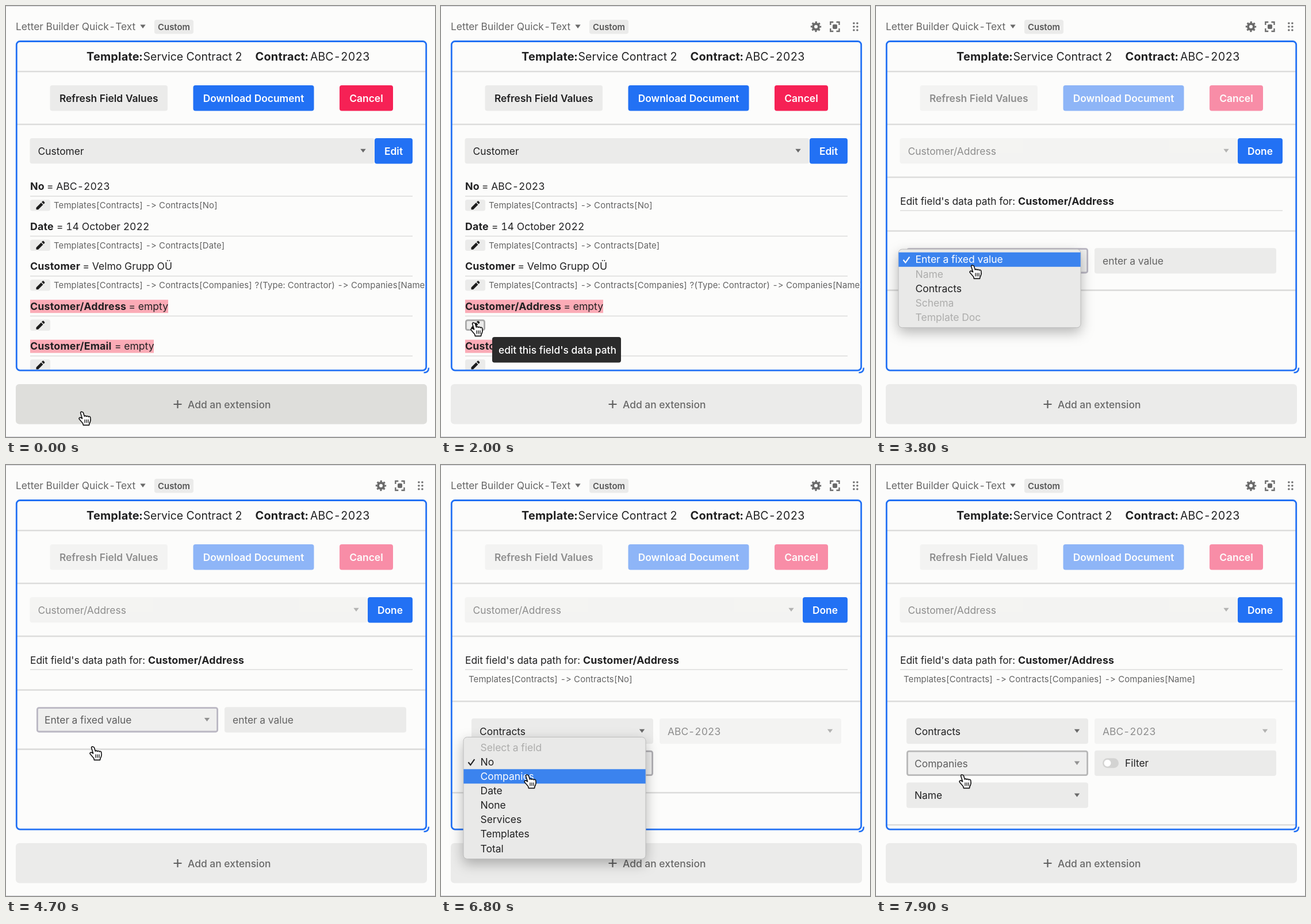
An HTML page for the animation above (8000 ms loop, 746x750 px).

```html
<!DOCTYPE html>
<html lang="en">
<head>
<meta charset="utf-8">
<title>Field data path editor</title>
<style>
  html, body { margin: 0; width: 100%; height: 100%; overflow: hidden; background: #fcfcfb; }
  svg { display: block; width: 746px; height: 750px; }
  text {
    font-family: Inter, "Open Sans", sans-serif;
    font-size: 17.4px;
    font-feature-settings: "calt" 0, "tnum" 1;
    fill: #212122;
    white-space: pre;
  }
  .bold { font-size: 17.8px; font-weight: 700; letter-spacing: .2px; }
  .mid { font-weight: 500; }
  .semi { font-weight: 600; }
  .value { font-size: 17.6px; }
  .head { font-size: 19.5px; }
  .head.bold { font-size: 19.9px; }
  .path { font-size: 14.9px; letter-spacing: .13px; fill: #636363; }
  .menu { font-size: 17.5px; }
  .shadow { filter: drop-shadow(0 8px 11px rgba(0, 0, 0, .28)); }
</style>
</head>
<body>
<svg id="stage" viewBox="0 0 746 750"></svg>
<script>
const LOOP = 8000, STEP = 100;
const BLUE = '#2271f4', RED = '#f62155', GREY = '#ebebea', RULE = '#dcdcdb', ICON = '#6a6a6a';
const ROW_H = 25.1, MENU_PAD = 5.5;

// Moments at which the interface switches state.
const T = {
  enter: 600, leaveAdd: 500, tip: 1600, press: 1900, edit: 2400,
  hover: 2900, open1: 3300, close1: 4600, contracts: 5000,
  hoverNo: 5300, open2: 5800, close2: 7100, companies: 7500
};

// Pointer hot spot: time, x, y.
const track = [
  [0, 133, 706], [200, 133, 706], [1300, 58, 551], [2400, 58, 551],
  [3100, 169, 450], [3800, 169, 451], [4300, 152, 490], [4900, 152, 490],
  [5400, 158, 517], [6200, 158, 517], [6700, 151, 539], [LOOP, 151, 539]
];

const rect = (x, y, w, h, r, fill, extra = '') =>
  `<rect x="${x}" y="${y}" width="${w}" height="${h}" rx="${r}" fill="${fill}" ${extra}/>`;
const text = (x, y, s, cls = '', extra = '') =>
  `<text x="${x}" y="${y}" class="${cls}" ${extra}>${s}</text>`;
const path = (d, stroke, width, extra = '') =>
  `<path d="${d}" fill="none" stroke="${stroke}" stroke-width="${width}" ${extra}/>`;
const during = (from, to, s) => `<g data-from="${from}" data-to="${to}">${s}</g>`;
const faded = (s, o = .5) => `<g opacity="${o}">${s}</g>`;
const divider = y => path(`M19 ${y}H730`, RULE, 2.6);
const rule = y => path(`M42 ${y}H707`, RULE, 1.4);
const arrow = (x, y) => `<path d="M${x - 4.7} ${y - 3.2}h9.4l-4.7 6.3z" fill="${ICON}"/>`;
const ring = (x, y, w, h, color = '#b0afb4') =>
  rect(x + 1.4, y + 1.4, w - 2.8, h - 2.8, 3, 'none', `stroke="${color}" stroke-width="2.8"`);

const button = (x, w, y, label, fill, color) =>
  rect(x, y, w, 44.5, 4, fill) +
  text(x + w / 2, y + 29, label, 'semi', `text-anchor="middle" style="fill:${color}"`);

const select = (x, y, w, label) =>
  rect(x, y, w, 44.2, 4, GREY) + text(x + 14, y + 28.8, label) + arrow(x + w - 19.5, y + 22);

const toolbar = () =>
  button(76.5, 204.5, 138, 'Refresh Field Values', GREY, '#212122') +
  button(325.5, 210, 138, 'Download Document', BLUE, '#fff') +
  button(580, 93, 138, 'Cancel', RED, '#fff');

const pencil = y =>
  rect(42, y, 35, 19.5, 3.5, GREY) +
  `<path transform="translate(52.5 ${y + 2.2})" fill="#1c1c1c"
    d="M0 11.5V15h3.5L12 6.5 8.5 3zM9.5 2 11.2.4q.8-.7 1.6 0l1.8 1.8q.7.8 0 1.6L13 5.5z"/>`;

function field(i, name, eqX, value, source, markW) {
  const y = 320 + i * 69.5;
  return (markW ? rect(42, y - 17.3, markW, 23, 0, '#fbabb6') : '') +
    text(42, y, name, 'bold') + text(eqX, y, '= ' + value, 'value') +
    rule(y + 11) + pencil(y + 17) + text(83, y + 32.3, source, 'path');
}

function menu(top, items, checked) {
  const center = i => top + MENU_PAD + (i + .5) * ROW_H;
  const rows = items.map((s, i) => {
    const off = s[0] === '~';
    return text(68.5, center(i) + 6.2, off ? s.slice(1) : s, 'menu',
      `data-row="${i}" ${off ? 'data-off style="fill:#adadac"' : ''}`);
  }).join('');
  const c = center(checked);
  return `<g class="menu-box" data-top="${top}">` +
    rect(39, top, 317, items.length * ROW_H + 2 * MENU_PAD, 6.5, '#e9e9e8',
      'class="shadow" stroke="#bcbcbc" stroke-width="1"') +
    rect(39.3, 0, 316.4, ROW_H, 0, '#3b83ee', 'class="mark"') + rows +
    path(`M47.5 ${c + .5}l3.8 4.8 7-10`, '#212122', 2.1, `class="tick" data-row="${checked}"`) + '</g>';
}

const contracts = 'Templates[Contracts] -> Contracts';

const chrome =
  path('M0 .5H746M0 749.5H746', '#d5d5da', 1) +
  text(17, 42.3, 'Letter Builder Quick-Text', '', 'style="fill:#666"') + arrow(238, 35.8) +
  rect(258, 24, 68, 24.5, 4, GREY) +
  text(292, 41.8, 'Custom', 'semi', 'text-anchor="middle" style="font-size:14.9px;fill:#555"') +
  during(T.enter, LOOP,
    `<g fill="none" stroke="${ICON}">
      <circle cx="652" cy="36" r="5" stroke-width="4"/>
      <circle cx="652" cy="36" r="7.8" stroke-width="2.8" stroke-dasharray="3.1 3.026" stroke-dashoffset="1.55"/>
      <path d="M677.3 33v-5h5M687.5 28h5v5M692.5 39v5h-5M682.3 44h-5v-5" stroke-width="2.3"/>
    </g>` + rect(681, 32, 8, 8, 2, ICON) +
    [0, 1, 2, 3, 4, 5].map(i =>
      rect(716.3 + i % 2 * 6, 28.4 + (i >> 1) * 6, 3.2, 3.2, 1, ICON)).join(''));

const addButton =
  rect(17, 658, 715, 69.5, 6, GREY) +
  during(0, T.leaveAdd, rect(17, 658, 715, 69.5, 6, '#dededb')) +
  path('M291.5 693h14M298.5 686v14', '#606060', 2.2) +
  text(316, 699.6, 'Add an extension', 'mid', 'style="fill:#686868"');

const listView =
  toolbar() + select(41.5, 230, 599, 'Customer') +
  button(641, 66, 230, 'Edit', BLUE, '#fff') +
  field(0, 'No', 71, 'ABC-2023', contracts + '[No]') +
  field(1, 'Date', 88, '14 October 2022', contracts + '[Date]') +
  field(2, 'Customer', 133.5, 'Velmo Grupp OÜ',
    contracts + '[Companies] ?(Type: Contractor) -> Companies[Name]') +
  field(3, 'Customer/Address', 213.5, 'empty', '', 240) +
  field(4, 'Customer/Email', 189, 'empty', '', 215) +
  during(T.press, T.edit, ring(42, 545.5, 35, 19.5, '#a8a8a8')) +
  during(T.tip, T.edit, rect(89, 576, 224, 44.5, 4, '#2b2b2b') +
    text(100, 605, "edit this field's data path", 'mid', 'style="fill:#fff"'));

const fixedSelect = select(53, 421.2, 316, 'Enter a fixed value');
const fixedView = divider(391.5) + divider(494.6) +
  during(0, T.hover, fixedSelect) +
  during(T.hover, LOOP, faded(fixedSelect, .72)) +
  during(T.open1, LOOP, ring(53, 421.2, 316, 44.2, '#bab7c3')) +
  rect(380, 421.2, 316, 44.2, 4, GREY) +
  text(394, 450, 'enter a value', '', 'style="fill:#636363"');

const linkedRow = divider(411.2) + select(53, 441, 316, 'Contracts') +
  faded(select(380, 441, 316, 'ABC-2023'));

const noSelect = select(53, 496.8, 316, 'No');
const numberView = linkedRow + divider(570.3) + text(48, 378, contracts + '[No]', 'path') +
  during(0, T.hoverNo, noSelect) +
  during(T.hoverNo, LOOP, faded(noSelect, .72)) +
  during(0, T.open2, ring(53, 441, 316, 44.2, '#a9a9a9')) +
  during(T.open2, LOOP, ring(53, 496.8, 316, 44.2));

const companyView = linkedRow + divider(626.3) +
  text(48, 378, contracts + '[Companies] -> Companies[Name]', 'path') +
  faded(select(53, 496.8, 316, 'Companies'), .72) + ring(53, 496.8, 316, 44.2, '#b8b8b8') +
  rect(380, 496.8, 316, 44.2, 4, GREY) +
  rect(394, 510.3, 28, 17, 8.5, '#d3d3d2') + '<circle cx="402.5" cy="518.8" r="6" fill="#fff"/>' +
  text(433, 525.4, 'Filter') +
  select(53, 552.6, 316, 'Name');

const editView =
  faded(toolbar()) + faded(select(41.5, 230, 587, 'Customer/Address')) +
  button(629, 78, 230, 'Done', BLUE, '#fff') + divider(298) +
  text(42, 345.8, "Edit field's data path for:") + text(247, 345.8, 'Customer/Address', 'bold') + rule(356) +
  during(T.edit, T.contracts, fixedView) +
  during(T.contracts, T.companies, numberView) +
  during(T.companies, LOOP, companyView);

const panel =
  '<clipPath id="inside"><rect x="18" y="61" width="713" height="572" rx="6"/></clipPath>' +
  '<g clip-path="url(#inside)">' +
  text(140, 95.3, 'Template:', 'head bold') + text(238.5, 95.3, 'Service Contract 2', 'head') +
  text(433.5, 95.3, 'Contract:', 'head bold') + text(529, 95.3, 'ABC-2023', 'head') +
  divider(114) + divider(206) +
  during(0, T.edit, listView) + during(T.edit, LOOP, editView) + '</g>' +
  rect(18.3, 61.5, 712.4, 572.6, 6, 'none', `stroke="${BLUE}" stroke-width="2.8"`) +
  path('M726.5 638Q735 638 735 629.5', BLUE, 2.6);

const menus =
  during(T.open1, T.close1,
    menu(423.2, ['Enter a fixed value', '~Name', 'Contracts', '~Schema', '~Template Doc'], 0)) +
  during(T.open2, T.close2,
    menu(473.6, ['~Select a field', 'No', 'Companies', 'Date', 'None', 'Services', 'Templates', 'Total'], 1));

const hand = `<g id="hand"><path fill="#fff" stroke="#111" stroke-width="1.6" stroke-linejoin="round"
  d="M6 1.2C4.3.7 3.2 2 3.7 3.6L6.6 13C5.2 11.6 3 10.6 1.6 11.6.4 12.6 1.2 14 2.3 15L7.5 21l1 3.4h10l.5-2.9
  c1.8-3 2.5-5.5 2-8.3l-.4-2.6c-.6-1.8-2.8-1.7-3.2-.6-.4-1.8-2.8-2-3.5-.6-.7-1.6-2.7-1.6-3.5-.4L8.3 2.6C7.8 1.6 7 1.3 6 1.2z"/>
  ${path('M11 14.5V20.5M14 14.5V20.5M17 14.5V20.5', '#111', 1.3)}</g>`;

const stage = document.getElementById('stage');
stage.innerHTML = chrome + addButton + panel + menus + hand;

const timed = [...stage.querySelectorAll('[data-from]')];
const boxes = [...stage.querySelectorAll('.menu-box')];
const pointer = document.getElementById('hand');

function pointerAt(t) {
  const i = track.findIndex(k => k[0] > t);
  const [t0, x0, y0] = track[i - 1], [t1, x1, y1] = track[i];
  const u = (t - t0) / (t1 - t0), e = u * u * (3 - 2 * u);
  return [x0 + (x1 - x0) * e, y0 + (y1 - y0) * e];
}

function highlight(box, y) {
  const top = +box.dataset.top + MENU_PAD;
  const row = Math.floor((y - top) / ROW_H);
  const item = box.querySelector(`text[data-row="${row}"]`);
  const on = item && !('off' in item.dataset);
  const mark = box.querySelector('.mark');
  mark.setAttribute('y', top + row * ROW_H);
  mark.style.display = on ? '' : 'none';
  for (const el of box.querySelectorAll('text:not([data-off])'))
    el.style.fill = on && el === item ? '#fff' : '';
  const tick = box.querySelector('.tick');
  tick.setAttribute('stroke', on && +tick.dataset.row === row ? '#fff' : '#212122');
}

function draw(t) {
  const [x, y] = pointerAt(t);
  for (const el of timed)
    el.style.display = t >= +el.dataset.from && t < +el.dataset.to ? '' : 'none';
  for (const box of boxes) highlight(box, y);
  pointer.setAttribute('transform', `translate(${x - 7} ${y - 1})`);
}

const start = performance.now();
function tick() {
  const t = (performance.now() - start) % LOOP;
  draw(Math.floor(t / STEP) * STEP);
  requestAnimationFrame(tick);
}
tick();
</script>
</body>
</html>
```
